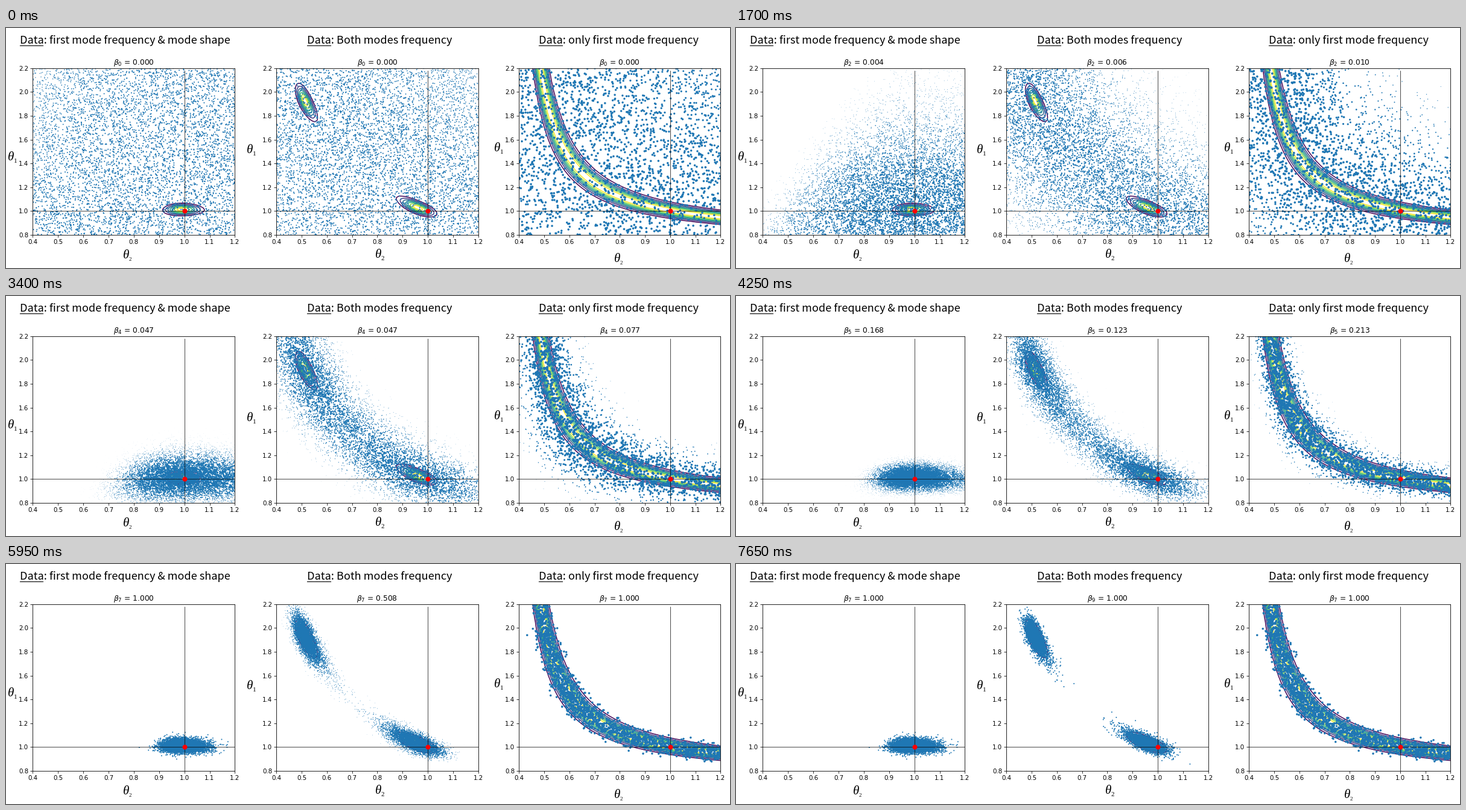
A matplotlib script for the animation above (8.5 s loop, 1200 by 399 pixels).

```python
import numpy as np
import matplotlib.pyplot as plt
from matplotlib.animation import FuncAnimation
from matplotlib.lines import Line2D

W, H = 1200, 399
PX = 0.72  # points per pixel at 100 dpi
STAGES, STAGE_MS = 10, 850
X_RANGE, Y_RANGE = (0.4, 1.2), (0.8, 2.2)
UNDERFLOW = 745  # exp(-misfit) becomes zero beyond this

plt.rcParams["font.family"] = "DejaVu Sans"
rng = np.random.default_rng(4)


def modal(t2, t1):
    """Both eigenvalues and the first mode shape ratio of a two-storey frame."""
    total, root = t1 + 2 * t2, np.sqrt(t1 ** 2 + 4 * t2 ** 2)
    low, high = (total - root) / 2, (total + root) / 2
    return {"low": low, "high": high, "shape": t2 / (t2 - low)}


def misfit(t2, t1, data, sigma):
    values = modal(t2, t1)
    return sum((values[k] / v - 1) ** 2 for k, v in data.items()) / (2 * sigma ** 2)


def grid(nx, ny):
    return np.meshgrid(np.linspace(*X_RANGE, nx), np.linspace(*Y_RANGE, ny))


def draw_samples(beta, beta_next, count, data, sigma):
    """Tempered posterior samples and relative dot areas, fading with the next weight."""
    nx, ny = 700, 600
    t2, t1 = (g.ravel() for g in grid(nx, ny))
    cost = misfit(t2, t1, data, sigma)
    p = np.exp(-beta * cost)
    if beta > 0:
        p[cost > UNDERFLOW] = 0
    pick = rng.choice(p.size, count, p=p / p.sum())
    cell = [np.ptp(X_RANGE) / nx, np.ptp(Y_RANGE) / ny]
    points = np.column_stack([t2[pick], t1[pick]])
    points += rng.uniform(-0.5, 0.5, points.shape) * cell
    area = np.exp(-(beta_next - beta) * cost[pick] / 2)
    return points, area / area.mean()


def px_text(x, y, text, size, **style):
    fig.text(x / W, 1 - y / H, text, fontsize=size * PX, **style)


def theta(x, y, index, sub_size):
    px_text(x, y, "θ", 21, family="Liberation Serif", style="italic")
    px_text(x + 10, y + 4, index, sub_size, family="Liberation Serif")


class Panel:
    def __init__(self, left, width, heading, heading_at, label1, label2,
                 data, sigma, betas, count, dot):
        self.betas = betas
        self.dot_area = (dot * PX) ** 2
        nexts = betas[1:] + betas[-1:]
        self.stages = [draw_samples(b, n, count, data, sigma)
                       for b, n in zip(betas, nexts)]

        self.ax = ax = fig.add_axes([left / W, 1 - 343.9 / H, width / W, 277 / H])
        ax.set(xlim=X_RANGE, ylim=Y_RANGE)
        ax.set_xticks(np.arange(0.4, 1.21, 0.1))
        ax.set_yticks(np.arange(0.8, 2.21, 0.2))
        ax.xaxis.set_major_formatter("{x:.1f}")
        ax.yaxis.set_major_formatter("{x:.1f}")
        ax.tick_params(labelsize=10.2 * PX, length=3.6 * PX, width=0.8 * PX,
                       pad=3.6 * PX)
        for spine in ax.spines.values():
            spine.set_linewidth(0.85 * PX)

        t2, t1 = grid(100, 100)
        ax.contour(t2, t1, np.exp(-misfit(t2, t1, data, sigma)),
                   levels=np.arange(0.18, 0.95, 0.12), cmap="viridis",
                   linewidths=1.5 * PX, zorder=1)
        self.dots = ax.scatter([], [], color="C0", linewidths=0, zorder=2)
        hair = dict(color="black", lw=0.7 * PX, zorder=3)
        ax.plot(X_RANGE, [1, 1], **hair)
        ax.plot([1, 1], [0.8, 2.18], **hair)
        ax.plot(1, 1, "o", color="red", ms=8 * PX, mew=0, zorder=4)

        x, y = heading_at
        px_text(x, y, "Data: " + heading, 18.1, family="Noto Sans CJK JP")
        fig.add_artist(Line2D([x / W, (x + 38.5) / W], [1 - (y + 2.5) / H] * 2,
                              color="black", lw=1.1 * PX))
        theta(*label1, "1", 11)
        theta(*label2)

    def show(self, step):
        k = min(step, len(self.betas) - 1)
        points, area = self.stages[k]
        self.dots.set_offsets(points)
        self.dots.set_sizes(self.dot_area * area)
        self.ax.set_title(rf"$\beta_{{{k}}}$ = {self.betas[k]:.3f}",
                          fontsize=12.2 * PX, pad=5.6 * PX)


fig = plt.figure(figsize=(W / 100, H / 100), dpi=100, facecolor="white")
panels = [
    Panel(44.4, 335, "first mode frequency & mode shape", (23, 26),
          (3, 220), (194, 383, "2", 9),
          {"low": 0.3843, "shape": 1.635}, 0.024,
          [0, 0.0004, 0.004, 0.013, 0.047, 0.168, 0.560, 1.0], 5500, 2.0),
    Panel(448.3, 334.3, "Both modes frequency", (499, 26.5),
          (399, 208), (612, 382, "2", 11),
          {"low": 0.3852, "high": 2.565}, 0.024,
          [0, 0.002, 0.006, 0.018, 0.047, 0.123, 0.254, 0.508, 0.970, 1.0],
          5500, 2.0),
    Panel(850.4, 334, "only first mode frequency", (883, 26),
          (809, 205), (1008, 389, "2", 9),
          {"low": 0.3835}, 0.027,
          [0, 0.003, 0.010, 0.028, 0.077, 0.213, 0.585, 1.0], 2200, 3.5),
]


def update(step):
    for panel in panels:
        panel.show(step)
    return []


animation = FuncAnimation(fig, update, frames=STAGES, interval=STAGE_MS,
                          repeat=True, repeat_delay=0, blit=False)
plt.show()
```
